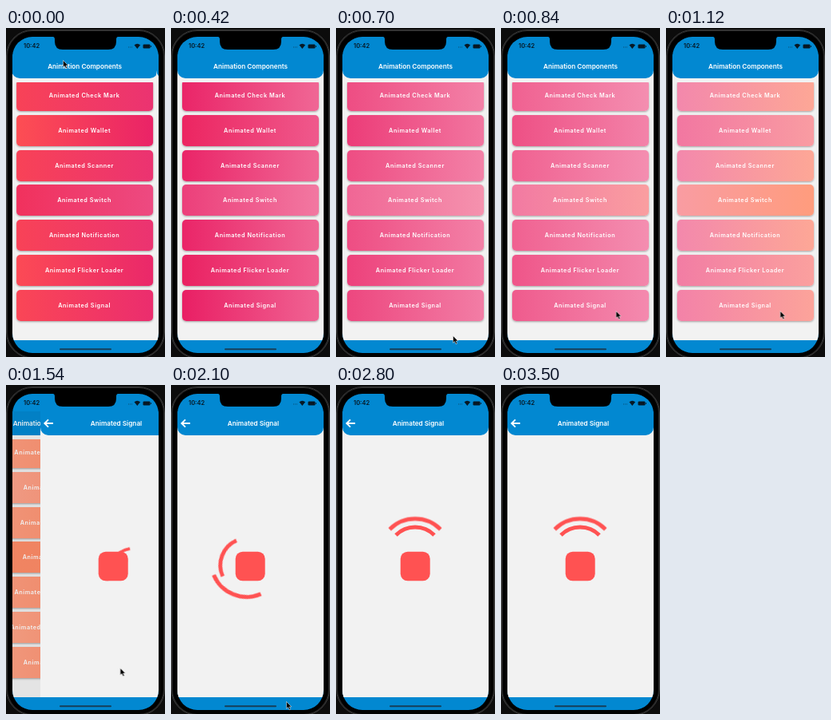
An HTML page that plays this animation: 199 by 412 pixels, repeating every 3640 ms.

```html
<!DOCTYPE html>
<html lang="en">
<head>
<meta charset="utf-8">
<title>Animation Components</title>
<style>
  @property --from { syntax: "<color>"; inherits: false; initial-value: #ff5252; }
  @property --to { syntax: "<color>"; inherits: false; initial-value: #e91e63; }

  html, body { margin: 0; width: 100%; height: 100%; overflow: hidden; background: #0c0c0c; }
  body { position: relative; font-family: Inter, "Open Sans", sans-serif; font-weight: 600; }
  div, header, svg { position: absolute; box-sizing: border-box; }

  /* Every animation is paused; the script moves --t in steps. */
  .list, .dim, .signal, .button, .arc, .cursor {
    animation: 3640ms linear var(--t, 0ms) infinite paused;
  }

  .phone {
    left: 0; top: 2px; width: 199px; height: 412px;
    border: 1px solid #3c3c3c; border-radius: 33px;
    background: #000; box-shadow: inset 0 0 0 1px #2a2a2a;
  }
  .screen {
    left: 8px; top: 11px; width: 183px; height: 396px;
    border-radius: 25px; overflow: hidden; background: #0288d1;
  }
  .page { left: 0; top: 22px; width: 183px; height: 358px; background: #f2f2f2; }
  header {
    left: 0; top: 0; width: 183px; height: 30px;
    border-radius: 0 0 10px 10px; background: #0288d1;
    color: #fff; font-size: 8.2px; line-height: 30px; text-align: center;
  }
  .signal header { padding-left: 7px; }
  .list { animation-name: recede; }
  .signal { animation-name: slide; }
  .dim { inset: 0; background: #000; opacity: 0; animation-name: dim; }

  .rows { left: 0; top: 35px; width: 183px; height: 323px; overflow: hidden; }
  .button {
    left: 5.5px; width: 171px; height: 39px; border-radius: 5px;
    color: #fff; font-size: 7.3px; letter-spacing: .55px;
    line-height: 39px; text-align: center;
    box-shadow: 0 1px 2.5px #0005;
    background: linear-gradient(90deg, var(--from), var(--to));
    animation-name: tint;
    animation-delay: calc(var(--t, 0ms) - 160ms - var(--lead));
  }

  .art { left: 0; top: 0; overflow: visible; }
  .arc { fill: none; stroke: #ff5252; stroke-width: 5; }
  .outer { animation-name: outer; }
  .inner { animation-name: inner; }
  .cursor { left: 0; top: 0; animation-name: point; animation-timing-function: step-end; }
  .time { left: 22px; top: 18px; font-size: 7.5px; line-height: 10px; color: #071824; }

  @keyframes recede {
    0% { transform: translateX(-.9px); }
    3.8%, 34.615% { transform: none; }
    38.462% { transform: translateX(-17.4px); }
    42.308% { transform: translateX(-44.4px); }
    46.154% { transform: translateX(-53.1px); }
    50%, 100% { transform: translateX(-54.9px); }
  }
  @keyframes slide {
    0% { transform: translateX(180px); }
    3.8%, 34.615% { transform: translateX(183px); }
    38.462% { transform: translateX(125px); }
    42.308% { transform: translateX(35px); }
    46.154% { transform: translateX(6px); }
    50%, 100% { transform: translateX(0); }
  }
  @keyframes dim {
    0%, 34.615% { opacity: 0; }
    42.308% { opacity: .057; }
    50%, 100% { opacity: .07; }
  }
  @keyframes tint {
    0% { --from: #ff5252; --to: #e91e63; }
    14.56% { --from: #e91e63; --to: #f06292; }
    27.75% { --from: #f06292; --to: #f48fb1; }
    36.54% { --from: #f48fb1; --to: #ffab91; }
    44.23% { --from: #ffab91; --to: #ff8a65; }
    52.47%, 100% { --from: #ff8a65; --to: #ff8a65; }
  }
  @keyframes outer {
    0%, 38.462% { transform: translate(0, 0) rotate(-65deg) translateY(0) scale(.6); }
    42.308% { transform: translate(-.7px, -8.2px) rotate(-55deg) translateY(0) scale(.75); }
    50% { transform: translate(-3px, -4px) rotate(80deg) translateY(-22px) scale(.95); }
    57.692% { transform: translate(-6px, -2px) rotate(202deg) translateY(-40px) scale(1); }
    61.538% { transform: translate(-3px, -1px) rotate(285deg) translateY(-50px) scale(1); }
    65.385% { transform: translate(0, 0) rotate(345deg) translateY(-58px) scale(1); }
    69.231% { transform: translate(0, 0) rotate(358deg) translateY(-59.3px) scale(1); }
    73%, 100% { transform: translate(0, 0) rotate(360deg) translateY(-59.5px) scale(1); }
  }
  @keyframes inner {
    0%, 42.308% { transform: rotate(-45deg) translateY(0) scale(.75); }
    50% { transform: rotate(150deg) translateY(-21px) scale(.95); }
    57.692% { transform: rotate(291deg) translateY(-37.5px) scale(1); }
    61.538% { transform: rotate(335deg) translateY(-45px) scale(1); }
    65.385% { transform: rotate(356deg) translateY(-48.6px) scale(1); }
    69.231%, 100% { transform: rotate(360deg) translateY(-49px) scale(1); }
  }
  @keyframes point {
    0% { transform: translate(71px, 40px); }
    3.8% { transform: translate(-20px, 0); }
    19.2% { transform: translate(146px, 385px); }
    23% { transform: translate(143.5px, 354px); }
    30.7% { transform: translate(142.5px, 354px); }
    49.9% { transform: translate(142.5px, 360px); }
    53.8% { transform: translate(143px, 380px); }
    57.6% { transform: translate(144px, 396px); }
    61.5%, 100% { transform: translate(-20px, 0); }
  }
</style>
</head>
<body>
<div class="phone"></div>
<div class="screen">
  <div class="page list">
    <header>Animation Components</header>
    <div class="rows"></div>
    <div class="dim"></div>
  </div>
  <div class="page signal">
    <header>Animated Signal</header>
    <svg class="art" width="183" height="358">
      <path d="M16 15H5.5M10 10.3L5.3 15L10 19.7" fill="none" stroke="#fff" stroke-width="1.9"/>
      <g transform="translate(91 194)">
        <path class="arc outer" d="M-31.8 13.2A45 45 0 0 1 31.8 13.2"/>
        <path class="arc inner" d="M-24 10A34 34 0 0 1 24 10"/>
        <rect x="-18.3" y="-18.3" width="37" height="36.6" rx="9" fill="#ff5252"/>
      </g>
    </svg>
  </div>
</div>
<svg class="art" width="199" height="412">
  <path d="M58 10.5Q61 11 61 14V17Q61 27 71 27H128Q138 27 138 17V14Q138 11 141 10.5Z"/>
  <g fill="#071824">
    <path d="M153 24h1m1 0h1m1 0h1" stroke="#0b4c73"/>
    <path d="M160.5 21.3Q164.3 18 168.1 21.3L164.3 26Z"/>
    <rect x="171.5" y="20.5" width="9" height="5" rx="1.3"/>
    <rect x="181" y="22" width=".8" height="2"/>
  </g>
  <rect x="67" y="401.2" width="65" height="2" rx="1" fill="#173e58"/>
</svg>
<div class="time">10:42</div>
<svg class="cursor" width="9" height="13">
  <path d="M.5 .5V9.2L2.5 7.4L4 10.8L5.6 10.1L4.2 6.9H6.8Z" stroke="#fff" stroke-width=".5"/>
</svg>
<script>
  const LOOP = 3640, STEP = 140;
  const names = ["Check Mark", "Wallet", "Scanner", "Switch", "Notification", "Flicker Loader", "Signal"];
  const leads = [0, -120, 0, 180, 0, -80, -40];
  const rows = document.querySelector(".rows");

  names.forEach((name, i) => {
    const button = document.createElement("div");
    button.className = "button";
    button.textContent = "Animated " + name;
    button.style.top = i * 43.8 - 3 + "px";
    button.style.setProperty("--lead", leads[i] + "ms");
    rows.append(button);
  });

  const start = performance.now();
  function tick() {
    const t = (performance.now() - start) % LOOP;
    const held = Math.floor(t / STEP) * STEP;
    document.documentElement.style.setProperty("--t", -held + "ms");
    requestAnimationFrame(tick);
  }
  tick();
</script>
</body>
</html>
```
